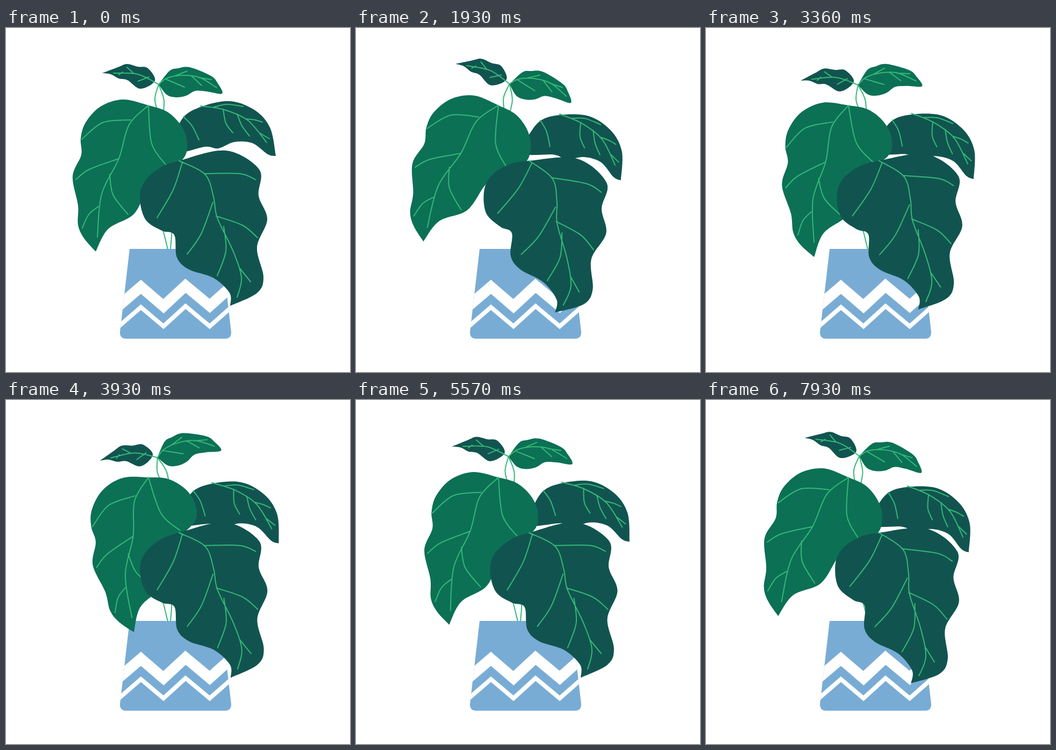
An HTML page that plays this animation: 640 by 640 pixels, repeating every 8 s.

```html
<!DOCTYPE html>
<html lang="en">
<head>
<meta charset="utf-8">
<title>Swaying plant</title>
<style>
  html, body { margin: 0; width: 100%; height: 100%; overflow: hidden; background: #fff; }
  svg { display: block; width: 100vw; height: 100vh; }
  .vein { fill: none; stroke: #34b877; stroke-width: 2; stroke-linecap: round; stroke-linejoin: round; }
  .light { fill: #0c7055; }
  .dark { fill: #11544f; }
</style>
</head>
<body>
<svg id="stage" viewBox="0 0 640 640">
  <clipPath id="potShape"><path d="M230 411H401L419 566Q419 578 408 578H223Q212 578 212 566Z"/></clipPath>
  <path class="vein" d="M286 356Q295 384 301 412M309 370Q308 392 306 412"/>
  <g clip-path="url(#potShape)" fill="none" stroke="#fff" stroke-miterlimit="9">
    <path fill="#79acd4" stroke="none" d="M200 400H430V590H200Z"/>
    <path stroke-width="20" d="M200 525L251 481.5 293 517.5 334 479.5 379 517 430 471.5"/>
    <path stroke-width="8" d="M200 563.500L251 519.500 293 555 334 517.500 379 555 430 510"/>
  </g>
</svg>
<script>
(() => {
  const stage = document.getElementById('stage');

  // Smooth path through a few points (Catmull-Rom as Béziers).
  function curve(text) {
    const p = text.trim().split(/\s+/).map(s => s.split(',').map(Number));
    const at = i => p[Math.max(0, Math.min(p.length - 1, i))];
    let d = 'M' + p[0];
    for (let i = 0; i < p.length - 1; i++) {
      const [a, b, c, e] = [at(i - 1), at(i), at(i + 1), at(i + 2)];
      const c1 = b.map((v, k) => v + (c[k] - a[k]) / 6);
      const c2 = c.map((v, k) => v - (e[k] - b[k]) / 6);
      d += `C${c1} ${c2} ${c}`;
    }
    return d;
  }

  function add(tag, attrs, parent) {
    const el = document.createElementNS('http://www.w3.org/2000/svg', tag);
    for (const key in attrs) el.setAttribute(key, attrs[key]);
    return parent.appendChild(el);
  }

  const group = () => add('g', {}, stage);
  const veins = (parent, ...lines) => add('path', { class: 'vein', d: lines.map(curve).join('') }, parent);
  function leaf(parent, shade, outline, ...lines) {
    add('path', { class: shade, d: curve(outline) + 'Z' }, parent);
    veins(parent, ...lines);
  }

  const backLeaf = group(), crown = group(), leftLeaf = group(), frontLeaf = group();

  leaf(backLeaf, 'dark',
    `502,238 491,185 460,151 409,136 342,156 318,190 316,231 370,221 395,224 425,212 458,214 487,235 502,238`,
    '330,165 346,182 359,208',
    '362,145 406,152 450,172 485,213',
    '387,147 411,142 441,146',
    '404,151 409,177 422,195',
    '430,160 439,182 453,201',
    '446,169 463,171 477,175',
    '473,196 490,206');

  veins(crown, '284,105 277,133 285,165', '284,105 294,135 291,170');
  leaf(crown, 'dark',
    `179,84 208,73 225,67 245,72 264,75 277,98 250,113 226,97 210,94 195,86 179,84`,
    '284,105 245,86 200,84', '237,84 225,73', '217,82 210,87', '266,91 246,99');
  leaf(crown, 'light',
    `284,105 304,80 320,75 342,73 381,89 394,103 402,122 373,118 352,117 335,126 316,129 299,124 284,105`,
    '284,105 300,93 329,88 360,92 392,111', '315,89 337,80', '345,89 364,107', '358,92 382,96', '297,95 332,110');

  leaf(leftLeaf, 'light',
    `167,416 145,391 134,366 134,330 124,276 140,236 139,206 148,176 176,146 218,133 265,144
     300,156 326,182 337,214 328,245 279,274 262,298 238,346 190,374 167,416`,
    '265,144 229,180 210,243 178,309 170,389',
    '232,171 180,176 141,207',
    '210,243 155,263 130,282',
    '193,272 199,310 227,347',
    '172,332 154,347 142,372',
    '265,144 271,215 297,254');

  leaf(frontLeaf, 'dark',
    `417,517 467,493 479,463 467,408 486,356 470,312 471,263 409,228 322,247 285,261 257,287
     249,318 260,357 290,377 313,385 318,427 340,449 386,465 416,493 417,517`,
    '322,247 370,272 386,314 393,353 422,414 438,464 430,501',
    '328,250 311,301 281,353',
    '368,271 435,271 464,282',
    '391,350 440,367 468,390',
    '385,324 363,383 337,421',
    '405,369 409,415 393,461',
    '434,446 455,472');

  // Swing between [seconds, value] turning points with a sine ease.
  const swing = (...keys) => t => {
    const i = keys.findIndex(key => key[0] > t);
    const [t0, v0] = keys[i - 1], [t1, v1] = keys[i];
    return v0 + (v1 - v0) * (1 - Math.cos(Math.PI * (t - t0) / (t1 - t0))) / 2;
  };

  const leftAngle = swing([0, 0], [.65, 1.5], [2, 9.1], [4.28, -15.9], [6.62, 9.15], [9.6, 4]);
  const frontAngle = swing([0, 0], [.65, 1.7], [2.45, 11.6], [4.1, -.5], [5.4, -.5], [6.3, 2.6], [8.6, 8.6]);
  const backAngle = swing([0, 0], [.4, .6], [2.5, 16.4], [4.8, 5], [7.1, 15.6], [9.4, 9]);
  const backShift = swing([0, 0], [2.5, 0], [4.9, 15.5], [6.95, -4], [9, -4]);

  const turn = (el, angle, x, y, shift = 0) =>
    el.setAttribute('transform', `translate(${shift} 0) rotate(${angle} ${x} ${y})`);

  const LOOP = 8000, FPS = 14;
  const start = performance.now();

  function tick() {
    const elapsed = (performance.now() - start) % LOOP;
    const t = Math.floor((elapsed + 5) * FPS / 1000) / FPS;
    turn(backLeaf, backAngle(t), 308, 222, backShift(t));
    turn(crown, leftAngle(t), 291, 115);
    turn(leftLeaf, leftAngle(t), 265, 144);
    turn(frontLeaf, frontAngle(t), 322, 247);
    requestAnimationFrame(tick);
  }
  tick();
})();
</script>
</body>
</html>
```
